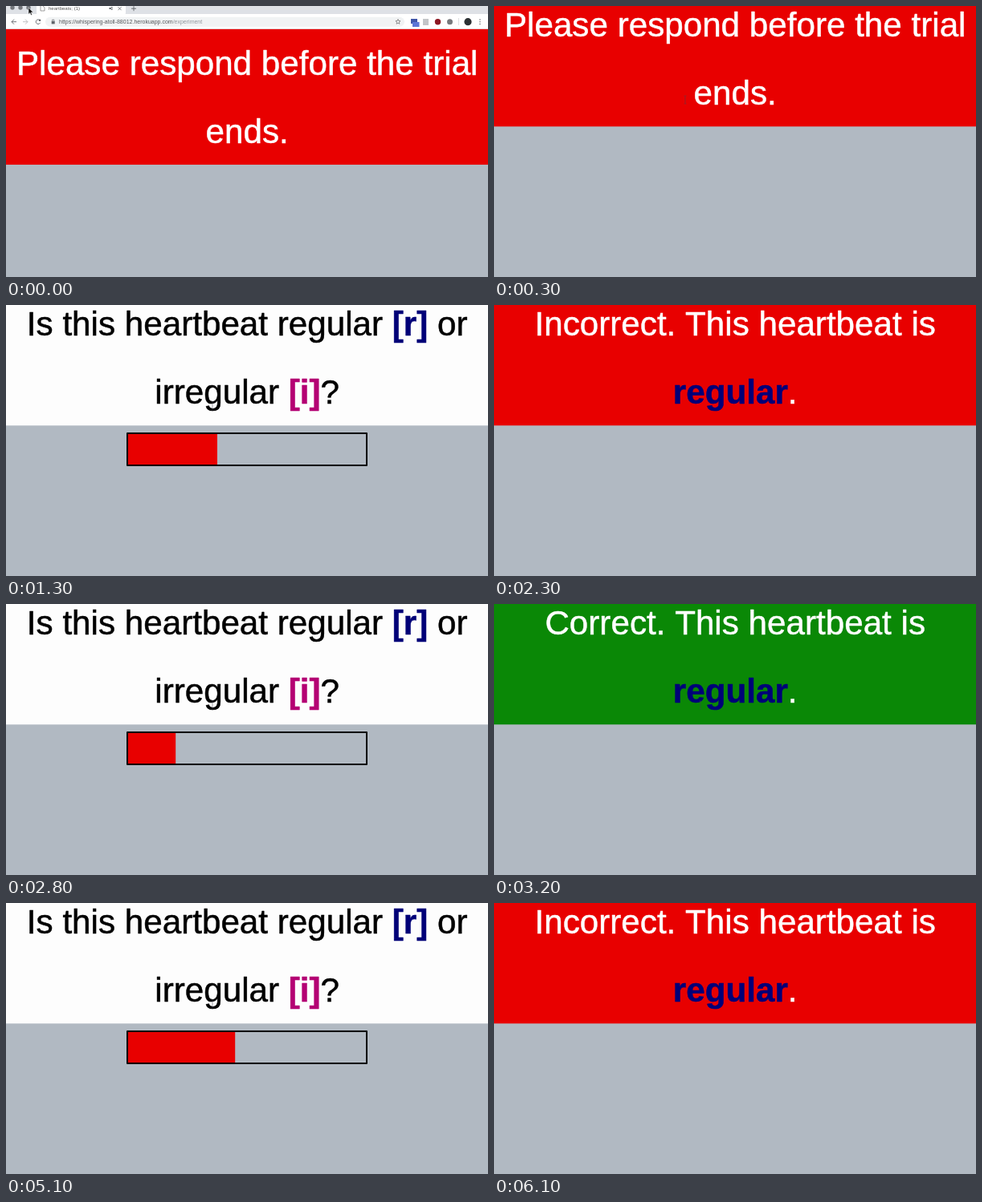
These frames come from a looping animation (600x338 px, 6200 ms). An HTML page with a canvas:

```html
<!DOCTYPE html>
<html lang="en">
<head>
<meta charset="utf-8">
<title>Heartbeat trial</title>
<style>
html, body { margin: 0; width: 100%; height: 100%; overflow: hidden; background: #b1b9c2; }
canvas { display: block; }
</style>
</head>
<body>
<canvas id="stage" width="600" height="338"></canvas>
<script>
const ctx = document.getElementById('stage').getContext('2d');
const LOOP = 6200, STEP = 100, TRIAL = 2000, SHIFT = 47.6;
const RED = '#e80000', GREEN = '#0a8806', NAVY = '#000078', PINK = '#b40073', PAPER = '#fdfdfd';
const SANS = '"Liberation Sans", Arial, sans-serif';

// A line is a list of [text, colour, bold] runs.
const question = {
  fill: PAPER,
  lines: [
    [['Is this heartbeat regular ', '#000'], ['[r]', NAVY, true], [' or', '#000']],
    [['irregular ', '#000'], ['[i]', PINK, true], ['?', '#000']]
  ]
};
const verdict = (word, fill) => ({
  fill,
  lines: [[[word + '. This heartbeat is', '#fff']], [['regular', NAVY, true], ['.', '#fff']]]
});
const late = {
  fill: RED,
  lines: [[['Please respond before the trial', '#fff']], [['ends.', '#fff']]]
};
const wrong = verdict('Incorrect', RED), right = verdict('Correct', GREEN);

const scenes = [
  { at: 0, card: late },
  { at: 600, card: question, barStart: 550 },
  { at: 1400, card: wrong },
  { at: 2400, card: question, barStart: 2400 },
  { at: 3200, card: right },
  { at: 4200, card: question, barStart: 4200 },
  { at: 5200, card: wrong }
];

function rect(x, y, w, h, color) {
  ctx.fillStyle = color;
  ctx.fillRect(x, y, w, h);
}

function dot(x, y, r, color) {
  ctx.fillStyle = color;
  ctx.beginPath();
  ctx.arc(x, y, r, 0, Math.PI * 2);
  ctx.fill();
}

function path(points, color, width = 1) {
  ctx.strokeStyle = color;
  ctx.lineWidth = width;
  ctx.beginPath();
  points.forEach(([x, y], i) => i ? ctx.lineTo(x, y) : ctx.moveTo(x, y));
  ctx.stroke();
}

function pill(x, y, w, h, r, color) {
  ctx.fillStyle = color;
  ctx.beginPath();
  ctx.roundRect(x, y, w, h, r);
  ctx.fill();
}

function label(text, x, y, size, color) {
  ctx.font = `${size}px ${SANS}`;
  ctx.fillStyle = color;
  ctx.fillText(text, x, y);
  return x + ctx.measureText(text).width;
}

// Headline text carries a thin outline for a slightly heavier weight.
function centredLine(runs, y) {
  const setFont = bold => { ctx.font = `${bold ? 'bold ' : ''}42.2px ${SANS}`; };
  const widths = runs.map(([text, , bold]) => {
    setFont(bold);
    return ctx.measureText(text).width;
  });
  let x = 300.2 - widths.reduce((a, b) => a + b, 0) / 2;
  ctx.lineWidth = 0.5;
  ctx.lineJoin = 'round';
  runs.forEach(([text, color, bold], i) => {
    setFont(bold);
    ctx.fillStyle = ctx.strokeStyle = color;
    ctx.fillText(text, x, y);
    ctx.strokeText(text, x, y);
    x += widths[i];
  });
}

function drawCard(card) {
  rect(0, -20, 600, 170.3, card.fill);
  card.lines.forEach((runs, i) => centredLine(runs, 38.4 + i * 84.8));
}

function drawBar(progress) {
  rect(152, 161, 296 * Math.min(1, Math.max(0, progress)), 38, RED);
  ctx.strokeStyle = '#000';
  ctx.lineWidth = 2;
  ctx.strokeRect(151, 160, 298, 40);
}

function textCursor(x, y) {
  ctx.globalAlpha = 0.55;
  path([[x, y - 5], [x, y + 5]], '#445', 0.9);
  path([[x - 1.5, y - 5], [x + 1.5, y - 5]], '#445', 0.7);
  path([[x - 1.5, y + 5], [x + 1.5, y + 5]], '#445', 0.7);
  ctx.globalAlpha = 1;
}

function drawStar(cx, cy, r) {
  const points = Array.from({ length: 11 }, (_, i) => {
    const a = -Math.PI / 2 + i * Math.PI / 5, d = i % 2 ? r * 0.45 : r;
    return [cx + d * Math.cos(a), cy + d * Math.sin(a)];
  });
  path(points, '#666', 0.7);
}

function drawBrowser() {
  const ink = '#5f6368';
  rect(0, 0, 600, 11, '#dee1e6');
  rect(0, 10, 600, 18.7, '#fff');
  rect(0, 28, 600, 0.7, '#dcdcde');
  pill(38, -4, 111, 16, 4, '#fff');
  [8, 18, 28].forEach(x => dot(x, 2, 2.7, '#74777c'));

  // Tab
  path([[43, 0], [43, 6], [48, 6], [48, 2], [46, 0]], '#777', 0.7);
  label('heartbeats; (1)', 53, 5.4, 6, '#555');
  rect(128.5, 2, 1.5, 2, ink);
  path([[130, 3], [132, 1], [132, 5], [130, 3]], ink, 0.8);
  path([[139.5, 1.2], [143.5, 5.2]], ink, 0.8);
  path([[143.5, 1.2], [139.5, 5.2]], ink, 0.8);
  path([[156, 3.2], [162, 3.2]], ink, 0.9);
  path([[159, 0.2], [159, 6.2]], ink, 0.9);

  // Navigation and address
  path([[13, 19.7], [7, 19.7]], ink, 0.9);
  path([[10, 16.7], [7, 19.7], [10, 22.7]], ink, 0.9);
  path([[21, 19.7], [27, 19.7]], '#b8babd', 0.9);
  path([[24, 16.7], [27, 19.7], [24, 22.7]], '#b8babd', 0.9);
  ctx.strokeStyle = ink;
  ctx.lineWidth = 0.9;
  ctx.beginPath();
  ctx.arc(40, 19.7, 2.8, 0.4, 5.6);
  ctx.stroke();
  rect(41, 16.7, 2.2, 2.2, ink);
  pill(49, 13.7, 447, 12, 6, '#f1f3f4');
  rect(56.7, 19, 4, 3.4, ink);
  path([[57.6, 19], [57.6, 17.2], [59.8, 17.2], [59.8, 19]], ink, 0.7);
  const end = label('https://whispering-atoll-88012.herokuapp.com', 66, 22.2, 7, '#55585c');
  label('/experiment', end, 22.2, 7, '#92979d');
  drawStar(488, 19.7, 3.2);

  // Extensions and menu
  rect(504, 16, 8, 6, '#4056a8');
  rect(506, 20, 8.5, 6, '#5b75d6');
  rect(519, 16, 7, 8, '#c3c5c8');
  dot(537.5, 19.7, 3.7, '#8c1622');
  dot(552.5, 19.7, 3.5, '#77797c');
  rect(563, 15, 0.7, 9, '#d0d2d5');
  dot(575, 19.7, 4.6, '#2c3033');
  [17, 19.7, 22.4].forEach(y => dot(590, y, 0.75, ink));
}

function drawArrow() {
  const shape = new Path2D('M28 2 L28 10.2 L29.9 8.5 L31.2 11.4 L32.5 10.8 L31.2 8 L33.8 8 Z');
  ctx.fillStyle = '#111';
  ctx.fill(shape);
  ctx.strokeStyle = '#fff';
  ctx.lineWidth = 0.5;
  ctx.stroke(shape);
}

function draw(t) {
  const scene = scenes.filter(s => s.at <= t).pop();
  const p = Math.min(1, t / 300);
  const slide = SHIFT * p * p * (3 - 2 * p);

  rect(0, 0, 600, 338, '#b1b9c2');
  ctx.save();
  ctx.translate(0, SHIFT - slide);
  drawCard(scene.card);
  if (scene.card === question) drawBar((t - scene.barStart) / TRIAL);
  ctx.restore();

  if (p < 1) {
    ctx.save();
    ctx.translate(0, -slide);
    drawBrowser();
    drawArrow();
    ctx.restore();
  } else if (scene.card === late) {
    textCursor(238, 117);
  } else if (scene.card !== wrong) {
    textCursor(257, 126);
  }
}

const start = performance.now();
function tick() {
  const t = (performance.now() - start) % LOOP;
  draw(Math.floor(t / STEP) * STEP);
  requestAnimationFrame(tick);
}
tick();
</script>
</body>
</html>
```
